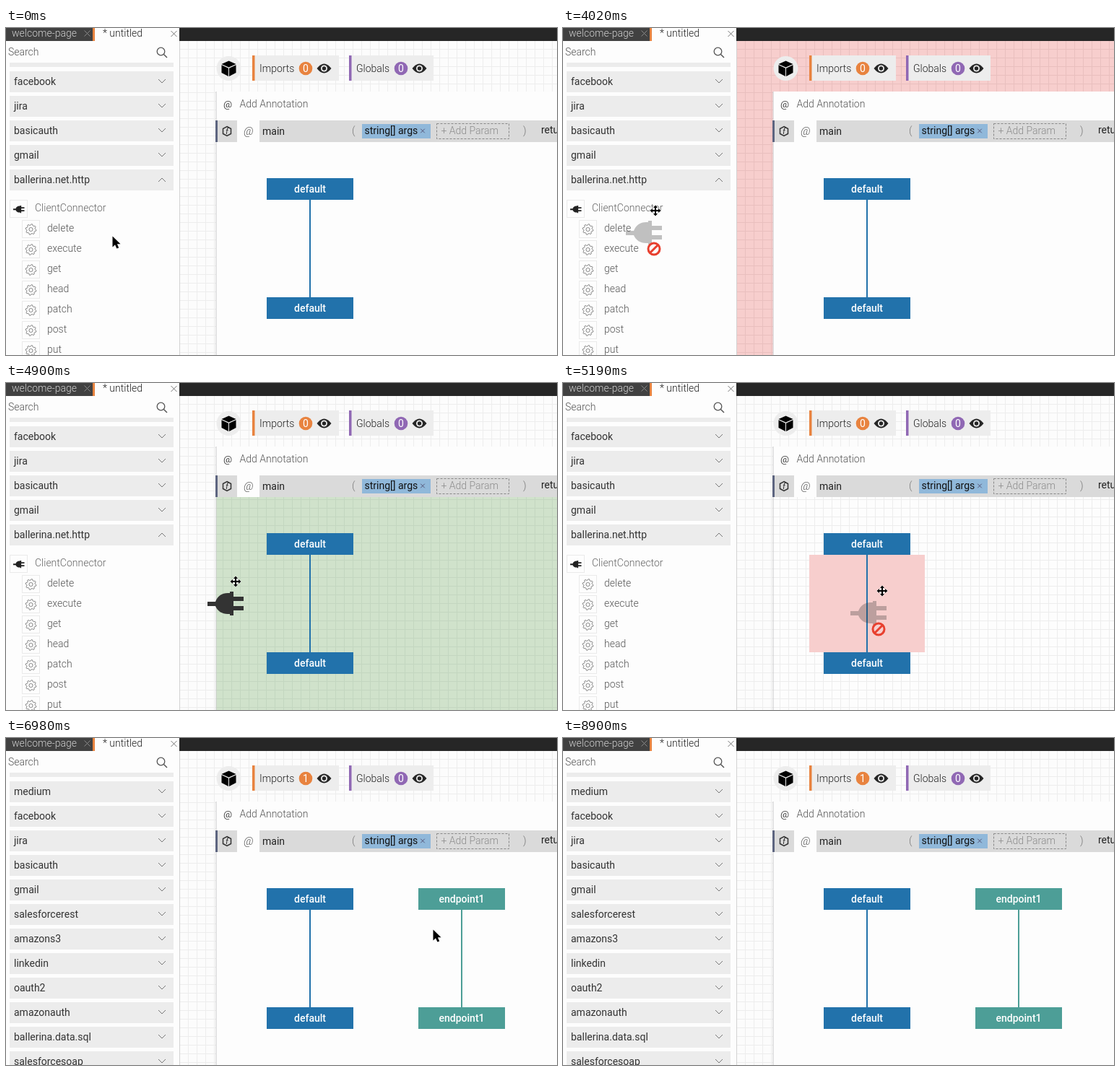
An HTML page that plays this animation: 763x453 px, repeating every 9.63 s.

```html
<!DOCTYPE html>
<html lang="en">
<head>
<meta charset="utf-8">
<title>Drag a connector</title>
<style>
html, body { margin: 0; width: 100%; height: 100%; overflow: hidden; background: #fcfcfc; }
svg { display: block; width: 100%; height: 100%; font: 400 14px Roboto, sans-serif; }
text { white-space: pre; }
.light { font-weight: 300; }
.mid { text-anchor: middle; }
</style>
</head>
<body>
<svg id="stage" viewBox="0 0 763 453" xmlns="http://www.w3.org/2000/svg"></svg>
<script>
const LOOP = 9630;
const BLUE = '#2272ab', TEAL = '#4d9e97', ORANGE = '#e8833f', PURPLE = '#9068b4';

const rect = (x, y, w, h, fill, more = '') =>
  `<rect x="${x}" y="${y}" width="${w}" height="${h}" fill="${fill}" ${more}/>`;
const text = (x, y, s, fill = '#333', more = '') =>
  `<text x="${x}" y="${y}" fill="${fill}" ${more}>${s}</text>`;
const line = (d, color, width = 1, more = '') =>
  `<path d="${d}" fill="none" stroke="${color}" stroke-width="${width}" ${more}/>`;
const fill = (d, color, more = '') => `<path d="${d}" fill="${color}" ${more}/>`;
const disc = (x, y, r, color) => `<circle cx="${x}" cy="${y}" r="${r}" fill="${color}"/>`;
const group = (id, body, more = '') => `<g id="${id}" ${more}>${body}</g>`;
const cross = (x, y, r, color) =>
  line(`M${x - r} ${y - r}l${2 * r} ${2 * r}m0 ${-2 * r}l${-2 * r} ${2 * r}`, color);
const LIGHT = 'class="light"';

const PLUG = 'M0 14H11C14 6 20 2 28 2H31V0H36V7H50V13H36V20H50V26H36V33H31V31H28C20 31 14 27 11 20H0Z';
const ARROW = 'M.5.5V15.5L4 12.3L6.4 17.6L9.2 16.4L6.9 11.2H11.5Z';
const HAND = 'M3.5 9.5V2C3.5.2 6 .2 6 2V6.5C6.5 5.3 8.6 5.5 8.8 7C9.6 6 11.3 6.4 11.4 7.8' +
  'C12.4 7 14 7.6 14 9.2V12C14 14 12.8 14.8 12.6 17H5.6C5 14.5 2.6 13.2 1 10.6C.2 9 2.2 8 3.5 9.5Z';
const MOVE = 'M0-7.5L3-4H1V-1H4V-3L7.5 0L4 3V1H1V4H3L0 7.5L-3 4H-1V1H-4V3L-7.5 0L-4-3V-1H-1V-4H-3Z';

function gear(x, y) {
  let d = '';
  for (let i = 0; i < 32; i++) {
    const a = (i + .5) * Math.PI / 16, r = i % 4 < 2 ? 7.4 : 5.8;
    d += (i ? 'L' : 'M') + (x + r * Math.cos(a)).toFixed(1) + ' ' + (y + r * Math.sin(a)).toFixed(1);
  }
  return line(d + 'Z', '#777', .9) +
    `<circle cx="${x}" cy="${y}" r="2.6" fill="none" stroke="#777" stroke-width=".9"/>`;
}

const eye = (x, y) =>
  fill(`M${x - 10} ${y}Q${x} ${y - 13} ${x + 10} ${y}Q${x} ${y + 13} ${x - 10} ${y}Z`, '#262626') +
  disc(x, y, 4.5, '#ededed') + disc(x, y, 2.7, '#262626');

const chip = (x, w, label, color, cx, id) =>
  rect(x, 38, w, 35, '#ededed') + rect(x, 38, 3.5, 35, color) +
  text(x + 10, 61, label, '#222', LIGHT) + disc(cx, 56, 9.3, color) +
  text(cx, 61, '0', '#fff', `class="mid" id="${id}"`) + eye(cx + 25.5, 56);

const row = (name, i, open) => {
  const y = 60 + 34 * i;
  return rect(5, y, 227, 29, '#ececec') + text(11, y + 19, name) +
    line(open ? `M211 ${y + 17}l5-5l5 5` : `M211 ${y + 11}l5 5l5-5`, '#777');
};

const lifeline = (x, label, color) =>
  rect(x + 59, 238, 2, 135, color) +
  [208, 373].map(y => rect(x, y, 120, 30, color) +
    text(x + 60, y + 20, label, '#fff', 'class="mid" font-weight="500"')).join('');

const grid = (id, color) =>
  `<pattern id="${id}" x="241" y="18" width="12" height="12" patternUnits="userSpaceOnUse">` +
  line('M11.5 0V12M0 11.5H12', color) + '</pattern>';

const backdrop = `<defs>${grid('pale', '#ededed')}${grid('rosy', '#e9bfbe')}${grid('leafy', '#c3d6c0')}</defs>` +
  rect(240, 18, 523, 435, '#fcfcfc') + rect(240, 18, 523, 435, 'url(#pale)') +
  group('outside', rect(240, 18, 523, 435, '#f7cecd') + rect(240, 18, 523, 435, 'url(#rosy)'));

const editor =
  disc(308.5, 56, 17, '#ededed') +
  fill('M308.5 45.5L318.5 50L308.5 54.5L298.5 50ZM298.5 51.3L308 55.8V67L298.5 62ZM318.5 51.3L309 55.8V67L318.5 62Z', '#000') +
  chip(341, 120, 'Imports', ORANGE, 415, 'count') + chip(475, 117, 'Globals', PURPLE, 547, 'globals') +
  rect(291, 88, 472, 365, '#fdfdfd') +
  group('mesh', rect(291, 158, 472, 295, 'url(#pale)')) +
  group('valid', rect(291, 158, 472, 295, '#d0e2cb') + rect(291, 158, 472, 295, 'url(#leafy)')) +
  rect(290.5, 88, 1, 365, '#c9c9cc') +
  text(301, 110, '@', '#444', 'font-size="13.5"') + text(323.5, 110, 'Add Annotation', '#555', LIGHT) +
  rect(291, 128, 472, 30, '#dadada') + rect(290, 128, 3, 30, '#5d6580') +
  line('M306 136.5L311.5 139.5V146.5L306 149.5L300.5 146.5V139.5Z', '#333', 1.5) +
  text(306, 147, 'f', '#222', 'class="mid" font-size="10" font-style="italic"') +
  rect(320, 128, 31, 30, '#fdfdfd') +
  text(336, 148, '@', '#555', 'class="mid light" font-size="15" font-style="italic"') +
  text(355, 148, 'main', '#222') + text(479, 147, '(', '#777', LIGHT) +
  rect(493, 133, 95, 20, '#90b8da') + text(496.5, 147, 'string[] args', '#111') + cross(577, 142.5, 2.8, '#557') +
  rect(596.5, 132.5, 100, 21, 'none', 'stroke="#888" stroke-dasharray="3 2"') +
  text(602.5, 147, '+ Add Param', '#8c8c8c', LIGHT) + text(716, 147, ')', '#777', LIGHT) +
  text(741, 146, 'returns', '#222') +
  group('worker', rect(341, 238, 160, 135, '#f7cecd')) +
  lifeline(361, 'default', BLUE) + group('endpoint', lifeline(571, 'endpoint1', TEAL));

const tools = ['delete', 'execute', 'get', 'head', 'patch', 'post', 'put'];
const opened =
  ['facebook', 'jira', 'basicauth', 'gmail'].map((n, i) => row(n, i)).join('') +
  row('ballerina.net.http', 4, true) +
  rect(5.5, 238.5, 24, 24, '#fdfdfd', 'stroke="#eaeaea"') +
  group('hover', rect(5, 238, 223, 25, '#f1f1f1') +
    line('M198.5 243.5H205L208.5 247V256.5H198.5ZM205 243.5V247H208.5M200.5 249.5H206.5M200.5 251.5H206.5M200.5 253.5H206.5', '#333')) +
  fill(PLUG, '#222', 'transform="translate(10 246) scale(.31)"') +
  text(40, 254, 'ClientConnector', '#666', 'class="light" id="client"') +
  tools.map((n, i) => {
    const y = 266 + 28 * i;
    return rect(22.5, y + .5, 24, 24, '#fdfdfd', 'stroke="#eaeaea"') + gear(34.5, y + 13) +
      text(57, y + 16, n, '#555', LIGHT);
  }).join('');
const closed = ['medium', 'facebook', 'jira', 'basicauth', 'gmail', 'salesforcerest', 'amazons3', 'linkedin',
  'oauth2', 'amazonauth', 'ballerina.data.sql', 'salesforcesoap'].map((n, i) => row(n, i)).join('');

const side =
  rect(0, 0, 763, 18, '#262626') + rect(0, 0, 120, 18, '#414141') +
  text(8, 12, 'welcome-page', '#d0d0d0', LIGHT) + cross(112.5, 7.5, 4, '#888') +
  rect(0, 18, 240, 435, '#fdfdfd') + rect(123, 0, 117, 18, '#fdfdfd') + rect(120, 0, 3, 18, ORANGE) +
  text(134, 12, '* untitled', '#222', LIGHT) + cross(232.5, 8, 4, '#777') + rect(240, 18, 1, 435, '#d2d2d2') +
  text(3, 38, 'Search', '#555', LIGHT) +
  '<circle cx="214.500" cy="32.500" r="5.300" fill="none" stroke="#555" stroke-width="1.300"/>' +
  line('M218.500 36.500L223 41', '#555', 1.5) +
  rect(5, 48, 227, 6, '#ececec') +
  group('opened', opened) + group('closed', closed) +
  group('thumb', rect(231, 127, 7, 340, '#000', 'rx="3.5"'));

const pointer = (id, d, body, edge) => group(id, fill(d, body, `stroke="${edge}" stroke-width="1" paint-order="stroke"`));
const overlay =
  group('plug', fill(PLUG, '#333')) +
  group('deny', '<circle r="8" fill="none" stroke="#e8402f" stroke-width="3"/>' + line('M-5.500 5.500L5.500-5.500', '#e8402f', 3)) +
  pointer('arrow', ARROW, '#000', '#fff') +
  group('hand', fill(HAND, '#fff', 'stroke="#000" stroke-width="1.1"') + line('M7 10.500V14.500M9.200 10.500V14.500M11.400 10.500V14.500', '#000', .8)) +
  pointer('move', MOVE, '#000', '#fff');

const stage = document.getElementById('stage');
stage.innerHTML = backdrop + editor + side + overlay;
const el = {};
stage.querySelectorAll('[id]').forEach(n => el[n.id] = n);

// time, pointer, x, y, drop zone, how far the plug trails behind
const steps = [
  [0, 'arrow', 147, 288],
  [150, 'arrow', 140, 278],
  [300, 'arrow', 128, 266],
  [450, 'hand', 115, 256],
  [590, 'hand', 106, 255],
  [1330, 'hand', 125, 253],
  [1480, 'hand', 150, 250],
  [1630, 'hand', 163, 249],
  [1780, 'hand', 140, 248],
  [2520, 'hand', 124, 246],
  [2670, 'hand', 110, 245],
  [4020, 'move', 128, 253, 'outside', 8],
  [4170, 'move', 158, 256, 'outside', 16],
  [4310, 'move', 200, 260, 'outside', 20],
  [4460, 'move', 243, 265, 'outside', 20],
  [4600, 'move', 281, 269, 'outside', 20],
  [4750, 'move', 307, 272, 'outside', 19],
  [4900, 'move', 318, 275, 'valid', 6],
  [5050, 'move', 334, 279, 'valid', 8],
  [5190, 'move', 442, 288, 'worker', 11],
  [5340, 'move', 488, 284, 'worker', 12],
  [5490, 'move', 530, 278, 'valid', 10],
  [5630, 'move', 562, 272, 'valid', 8],
  [5780, 'move', 583, 269, 'valid', 4],
  [5930, 'move', 593, 267, 'valid', 0],
  [6980, 'arrow', 591, 265],
  [8310, 'arrow', 595, 282],
  [8460, 'arrow', 608, 318],
  [8600, 'arrow', 634, 362],
  [8750, 'arrow', 672, 424],
  [8900, 'none', 0, 0]
];

const show = (id, on) => el[id].style.display = on ? '' : 'none';
const place = (id, x, y) => el[id].setAttribute('transform', `translate(${x} ${y})`);

function draw(t) {
  const [, kind, x, y, zone, lag] = steps.findLast(s => s[0] <= t);
  for (const id of ['arrow', 'hand', 'move']) {
    show(id, id === kind);
    place(id, x, y);
  }
  for (const id of ['outside', 'valid', 'worker']) show(id, id === zone);
  show('mesh', zone === 'worker');

  const denied = zone && zone !== 'valid';
  show('plug', zone);
  show('deny', denied);
  if (zone) {
    const px = x - 33 - lag, py = y + 14;
    place('plug', px, py);
    place('deny', px + 39, py + 39);
    el.plug.setAttribute('opacity', denied ? .3 : 1);
  }

  const hover = kind === 'hand', dropped = t >= 6980;
  show('hover', hover);
  el.client.setAttribute('fill', hover ? '#e8743c' : '#666');
  show('opened', !dropped);
  show('closed', dropped);
  show('endpoint', dropped);
  el.count.textContent = dropped ? '1' : '0';
  el.thumb.setAttribute('opacity', t < 7120 || t >= 7710 ? 0 : t < 7570 ? .5 : .25);
}

const start = performance.now();
function tick() {
  draw((performance.now() - start) % LOOP);
  requestAnimationFrame(tick);
}
tick();
</script>
</body>
</html>
```
